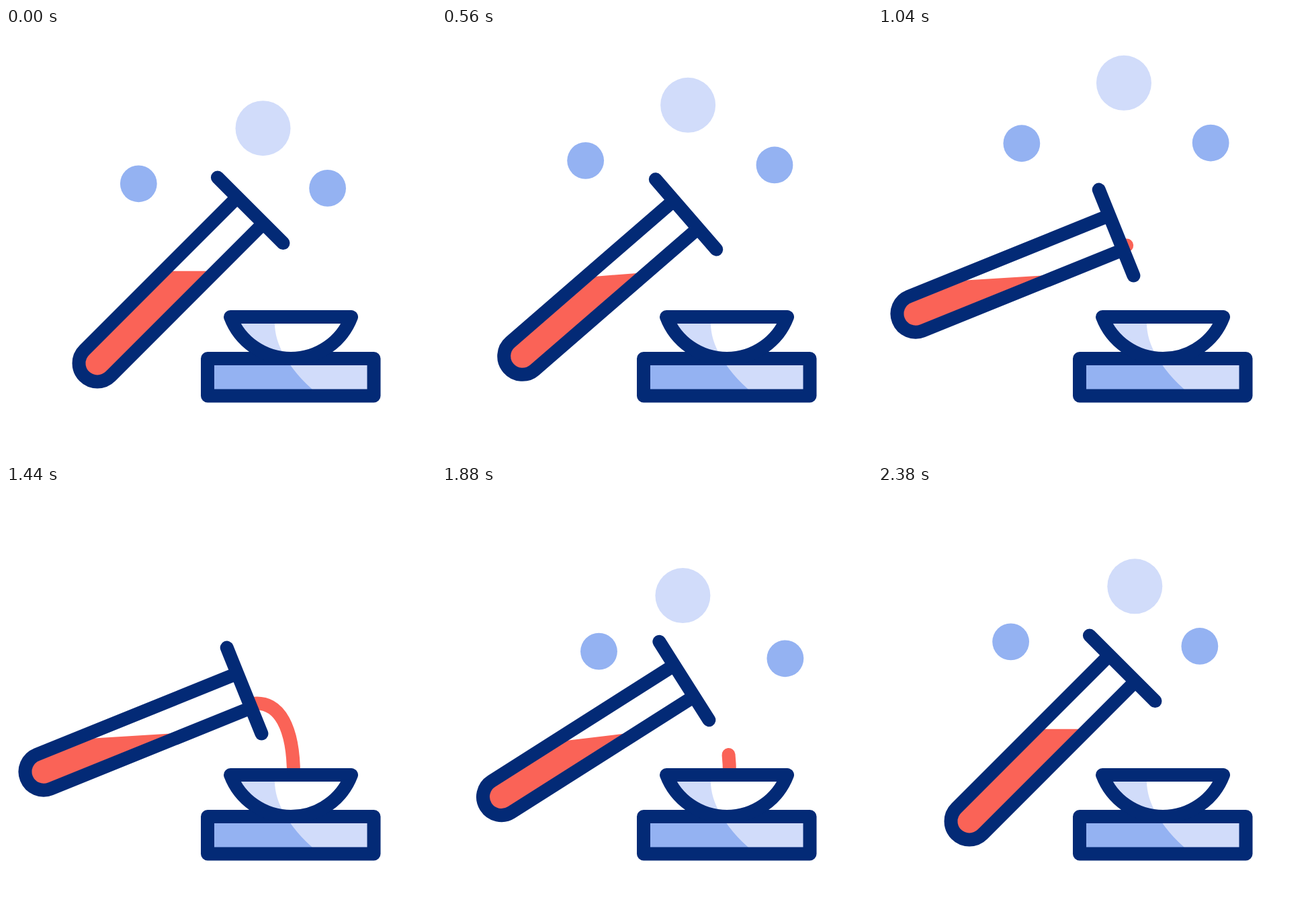
These frames come from a looping animation (640x640 px, 2400 ms). An HTML page:

```html
<!DOCTYPE html>
<html lang="en">
<head>
<meta charset="utf-8">
<title>Test tube pouring</title>
<style>
  html, body { margin: 0; width: 100%; height: 100%; overflow: hidden; background: #fff; }
  svg { display: block; width: 100vw; height: 100vh; }
  .line { fill: none; stroke: #032a76; stroke-width: 20; stroke-linecap: round; stroke-linejoin: round; }
  .red { fill: #fa6357; }
  .mid { fill: #94b2f2; }
  .light { fill: #d1dcfa; }
</style>
</head>
<body>
<svg viewBox="0 0 640 640">
  <circle class="bubble light" r="41"/>
  <circle class="bubble mid" r="27.4"/>
  <circle class="bubble mid" r="27.4"/>

  <path id="stream" pathLength="1" d="M366 324C408 318 428 362 428 430"
        fill="none" stroke="#fa6357" stroke-width="20" stroke-linecap="round"/>

  <!-- Tube lies along the x axis, with its round end at the origin -->
  <g id="tube">
    <path d="M322 -27.5H0A27.5 27.5 0 0 0 0 27.5H322Z" fill="#fff"/>
    <path id="liquid" class="red"/>
    <path class="line" d="M322 -27.5H0A27.5 27.5 0 0 0 0 27.5H322M322 -69V69"/>
  </g>

  <path class="light" d="M300 492H547.5V547.5H300Z"/>
  <path class="mid" d="M300 492H417C426 507 438 522 455 537L466 547H300Z"/>
  <path class="line" d="M300 492H547.5V547.5H300Z"/>

  <path d="M334 430A96.3 96.3 0 0 0 514 430Z" fill="#fff"/>
  <path class="light" d="M334 430A96.3 96.3 0 0 0 417 492C404 472 400 453 400 440V430Z"/>
  <path class="line" d="M334 430A96.3 96.3 0 0 0 514 430Z"/>
</svg>
<script>
const LOOP = 2400, STEP = 400;
const $ = id => document.getElementById(id);
const lerp = (a, b, k) => a + (b - a) * k;

// Eased progress from 0 to 1 between two times
const ease = (t, from, to) => {
  const k = Math.min(1, Math.max(0, (t - from) / (to - from)));
  return k * k * (3 - 2 * k);
};

// Eased value through keys spaced STEP apart
const track = (keys, t) => {
  const i = Math.min(keys.length - 2, Math.floor(t / STEP));
  return lerp(keys[i], keys[i + 1], ease(t, i * STEP, (i + 1) * STEP));
};

// side: sway direction, top: highest rise, back: sway and rise on return
const bubbles = [
  { x: 382.5, y: 149.2, side: -1, top: -76.2, backX: -30.6, backY: [31, 9.3, 0] },
  { x: 197.3, y: 231.8, side: 1, top: -65, backX: 46, backY: [33, 9.3, 0] },
  { x: 478.6, y: 238.4, side: 1, top: -76.2, backX: 41, backY: [52, 9.3, 0] }
];
const circles = document.querySelectorAll('.bubble');
const SWAY = 25.4;

function drawBubble(b, circle, t) {
  const leaving = t < 1600;
  const dx = leaving
    ? b.side * track([0, SWAY, 0, SWAY, SWAY], t)
    : track([0, b.backX, 0], t - 1600);
  const dy = leaving
    ? track([0, -SWAY, -2 * SWAY, b.top, b.top], t)
    : track(b.backY, t - 1600);
  const scale = leaving ? 1 - ease(t, 1200, 1440) : ease(t, 1600, 1800);
  circle.setAttribute('transform', `translate(${b.x + dx} ${b.y + dy}) scale(${scale})`);
}

function draw(now) {
  const t = now % LOOP;
  bubbles.forEach((b, i) => drawBubble(b, circles[i], t));

  const tilt = ease(t, 400, 1000) - ease(t, 1600, 2200);
  $('tube').setAttribute('transform',
    `rotate(${23 * tilt} 277.4 265.5) translate(136 499) rotate(-45)`);
  const upper = lerp(176, 88, tilt), lower = lerp(212, 196, tilt);
  $('liquid').setAttribute('d', `M${upper} -18H0A18 18 0 0 0 0 18H${lower}Z`);

  const head = ease(t, 1000, 1400), tail = ease(t, 1600, 2000);
  const stream = $('stream');
  stream.style.visibility = head > tail ? 'visible' : 'hidden';
  stream.setAttribute('stroke-dasharray', `${head - tail} 2`);
  stream.setAttribute('stroke-dashoffset', -tail);
}

const start = performance.now();
function frame() {
  draw(performance.now() - start);
  requestAnimationFrame(frame);
}
frame();
</script>
</body>
</html>
```
